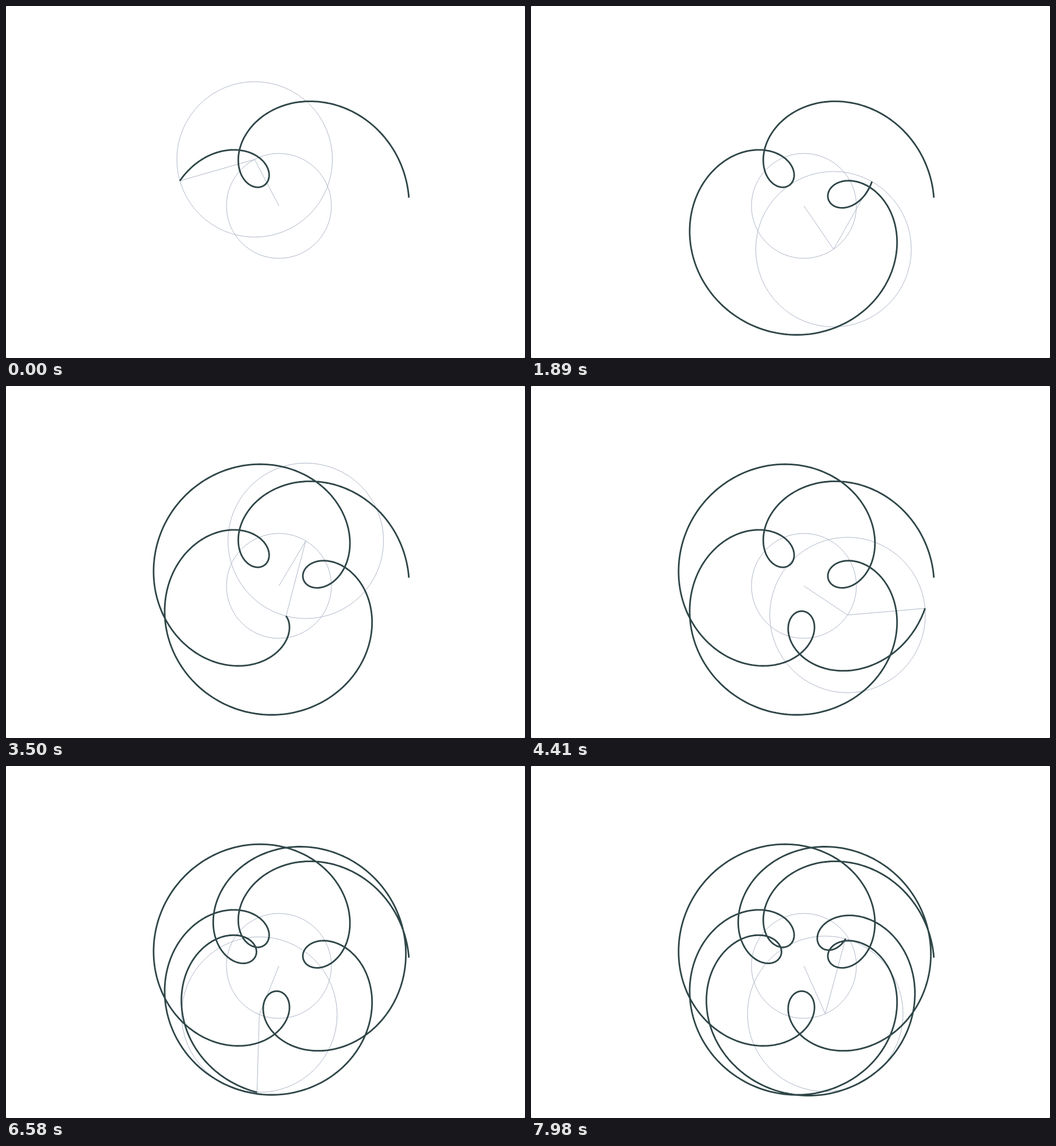
Animation, 890 px wide and 604 px high, one loop 8 s. Source, as an HTML page with a canvas:

```html
<!DOCTYPE html>
<html lang="en">
<head>
<meta charset="utf-8">
<title>Two-arm curve</title>
<style>
  html, body { margin: 0; width: 100%; height: 100%; overflow: hidden; background: #888; }
  canvas { display: block; border-radius: 2px; }
</style>
</head>
<body>
<canvas width="890" height="604"></canvas>
<script>
const ctx = document.querySelector('canvas').getContext('2d');
const LOOP = 8000, STEP = 70;
const CENTER = { x: 468, y: 343 };
const INNER = 90, OUTER = 133.4;
const SPEED_RATIO = 2.4366;   // inner turns per outer turn
const START = 2.3;            // outer angle where the trace begins, degrees

// [step, outer angle in degrees]: the rotation runs slightly unevenly
const KEYS = [[0, 196], [17, 335.1], [37, 505.7], [63, 724.9], [76, 834.4], [94, 988.3], [114, 1154.9]];

function angleAt(step) {
  const i = Math.max(1, KEYS.findIndex(([s]) => s >= step));
  const [s0, a0] = KEYS[i - 1], [s1, a1] = KEYS[i];
  return a0 + (a1 - a0) * (step - s0) / (s1 - s0);
}

function swing(from, radius, degrees) {
  const a = degrees * Math.PI / 180;
  return { x: from.x + radius * Math.cos(a), y: from.y - radius * Math.sin(a) };
}

const elbowAt = angle => swing(CENTER, INNER, angle * SPEED_RATIO);
const tipAt = angle => swing(elbowAt(angle), OUTER, angle);

function circle(c, radius) {
  ctx.beginPath();
  ctx.arc(c.x, c.y, radius, 0, 2 * Math.PI);
  ctx.stroke();
}

function polyline(points) {
  ctx.beginPath();
  points.forEach(p => ctx.lineTo(p.x, p.y));
  ctx.stroke();
}

function draw(time) {
  const angle = angleAt(Math.floor(time / STEP));
  const elbow = elbowAt(angle);

  ctx.fillStyle = '#fff';
  ctx.fillRect(0, 0, 890, 604);

  ctx.strokeStyle = '#b0b8c8';
  ctx.lineWidth = 1;
  circle(CENTER, INNER);
  circle(elbow, OUTER);
  polyline([CENTER, elbow, tipAt(angle)]);

  const trace = [];
  for (let a = START; a < angle; a += 1) trace.push(tipAt(a));
  trace.push(tipAt(angle));
  ctx.strokeStyle = '#2f4648';
  ctx.lineWidth = 2.8;
  ctx.lineJoin = 'round';
  polyline(trace);
}

const begin = performance.now();
function frame() {
  draw((performance.now() - begin) % LOOP);
  requestAnimationFrame(frame);
}
frame();
</script>
</body>
</html>
```
